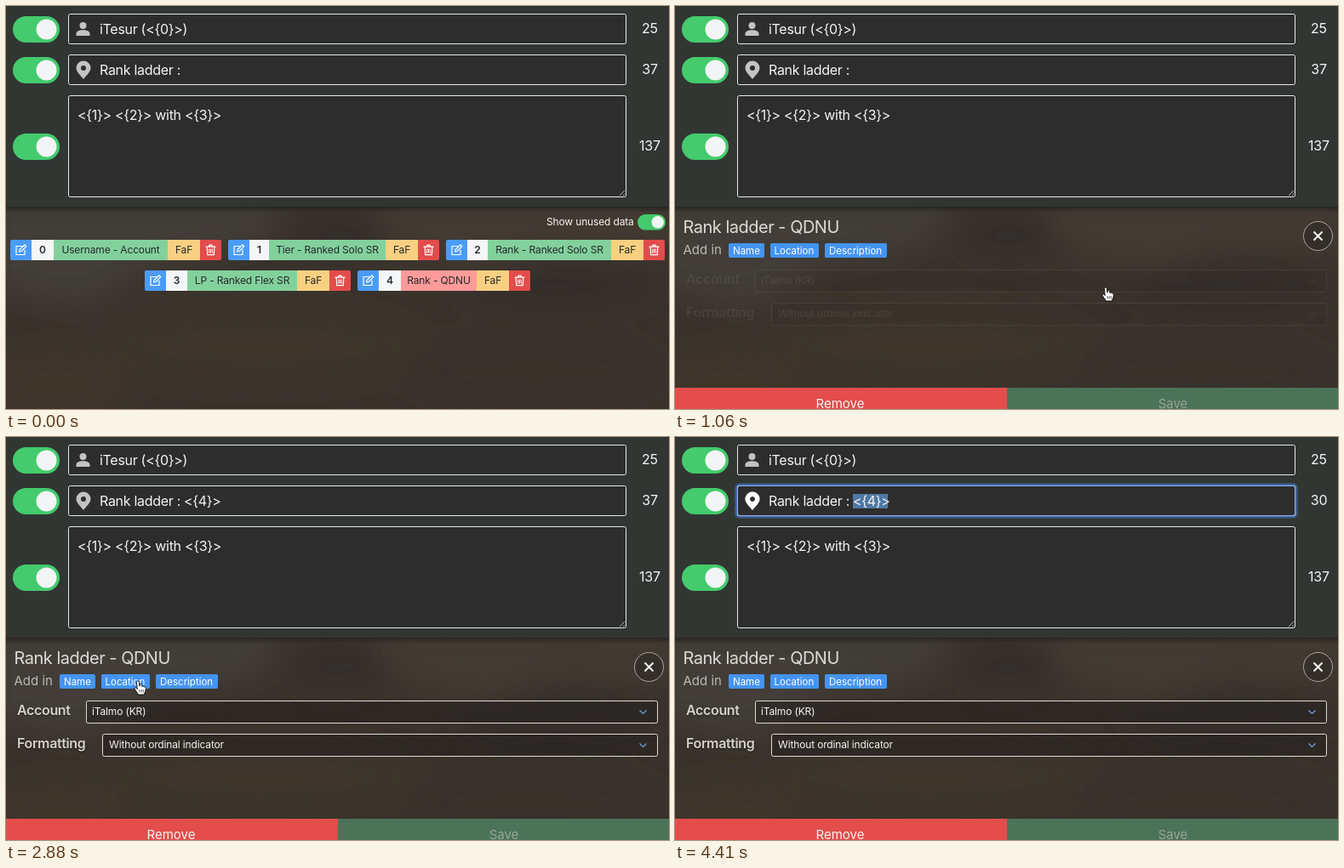
Animation, 779 px wide and 474 px high, one loop 5.82 s. Source, as an HTML page:

```html
<!DOCTYPE html>
<html lang="en">
<head>
<meta charset="utf-8">
<title>Ranked data editor</title>
<style>
html, body { margin: 0; width: 100%; height: 100%; overflow: hidden; background: #313632; }
svg { display: block; }
text { font: 12px Inter, Roboto, sans-serif; letter-spacing: -.15px; fill: #f4f4f4; }
.input { font-size: 16px; letter-spacing: -.3px; }
.count { font-size: 16px; letter-spacing: -.2px; text-anchor: middle; }
.mid { text-anchor: middle; }
.dark { fill: #25282b; }
.num { font-weight: 600; }
.title { font-size: 20px; letter-spacing: -.5px; fill: #dddbd8; }
.sub { font-size: 15px; letter-spacing: 0; fill: #bcb9b5; }
.badge { font-size: 11.5px; letter-spacing: 0; fill: #fff; }
.label { font-size: 16px; font-weight: 600; letter-spacing: -.35px; fill: #d5d2ce; text-shadow: 0 1px 2px #0008; }
.button { font-size: 15px; letter-spacing: 0; text-anchor: middle; }
.box { fill: #2d2d2d; stroke: #e9e9e9; }
.select { fill: #24211e88; stroke: #dedbd7; }
.line { fill: none; stroke: #fff; stroke-width: 1.2; stroke-linecap: round; stroke-linejoin: round; }

/* 99 ticks per loop: one tick is 1.0101% */
.anim { animation: 5820ms step-end -6ms infinite; }
#border { animation-name: border; }
#glow { animation-name: glow; }
#caret { animation-name: caret; }
#caret2 { animation-name: caret2; }
#tags { animation-name: tags; }
#panel { animation-name: panel; }
#form { animation-name: form; }
#token { animation-name: token; }
#before { animation-name: before; }
#after { animation-name: after; }
#select { animation-name: select; transform-box: fill-box; transform-origin: left; }
#cursor { animation-name: move; }
#arrow { animation-name: arrow; }
#hand { animation-name: hand; }
#beam { animation-name: beam; }

@keyframes border { 0%, 15.15% { opacity: 0 } 1.01%, 58.58% { opacity: 1 } }
@keyframes glow { 0%, 15.15% { opacity: 0 } 1.01%, 59.59% { opacity: 1 } }
@keyframes caret { 0%, 10.1% { opacity: 0 } 1.01% { opacity: 1 } }
@keyframes caret2 { 0%, 61.61% { opacity: 0 } 58.58% { opacity: 1 } }
@keyframes tags { 0% { opacity: 1 } 18.18% { opacity: 0 } }
@keyframes panel { 0% { opacity: 0 } 18.18% { opacity: 1 } }
@keyframes form {
  0% { opacity: .08 }
  18.18% { opacity: .08; animation-timing-function: steps(9) }
  27.27% { opacity: 1 }
}
@keyframes token { 0% { opacity: 0 } 45.45% { opacity: 1 } }
@keyframes before { 0% { opacity: 1 } 58.58% { opacity: 0 } }
@keyframes after { 0% { opacity: 0 } 58.58% { opacity: 1 } }
@keyframes select {
  0% { transform: scaleX(0) }
  60.6% { transform: scaleX(0); animation-timing-function: steps(4) }
  64.64% { transform: scaleX(1) }
}
@keyframes move {
  0% { transform: translate(497px, 424px) }
  4.04% { transform: translate(497px, 424px); animation-timing-function: steps(4) }
  8.08% { transform: translate(499px, 352px); animation-timing-function: steps(6) }
  14.14% { transform: translate(506px, 331px) }
  19.19% { transform: translate(506px, 331px); animation-timing-function: steps(8) }
  27.27% { transform: translate(400px, 342px); animation-timing-function: steps(4) }
  31.31% { transform: translate(205px, 314px); animation-timing-function: steps(2) }
  33.33% { transform: translate(164px, 296px); animation-timing-function: steps(4) }
  37.37% { transform: translate(155px, 291px) }
  38.38% { transform: translate(154px, 290px) }
  49.49% { transform: translate(155px, 287px); animation-timing-function: steps(3) }
  52.52% { transform: translate(172px, 240px); animation-timing-function: steps(3) }
  55.55% { transform: translate(203px, 130px); animation-timing-function: steps(3) }
  58.58% { transform: translate(210px, 76px) }
  60.6% { transform: translate(210px, 76px); animation-timing-function: steps(4) }
  64.64% { transform: translate(251px, 76px) }
  69.69% { transform: translate(252px, 96px); animation-timing-function: steps(3) }
  72.72% { transform: translate(259px, 260px); animation-timing-function: steps(3) }
  75.75% { transform: translate(270px, 480px) }
}
@keyframes arrow {
  0%, 11.11%, 32.32%, 53.53%, 75.75% { opacity: 0 }
  4.04%, 21.21%, 50.5%, 72.72% { opacity: 1 }
}
@keyframes hand { 0%, 21.21%, 50.5% { opacity: 0 } 11.11%, 32.32% { opacity: 1 } }
@keyframes beam { 0%, 72.72% { opacity: 0 } 53.53% { opacity: 1 } }
</style>
</head>
<body>
<svg width="779" height="474" viewBox="0 0 779 474">
  <defs>
    <filter id="soft" x="-50%" y="-50%" width="200%" height="200%"><feGaussianBlur stdDeviation="16"/></filter>
    <filter id="halo" x="-5%" y="-40%" width="110%" height="180%"><feGaussianBlur stdDeviation="1.2"/></filter>
    <clipPath id="lower"><rect y="236" width="779" height="238"/></clipPath>
    <linearGradient id="edge" x2="0" y2="1"><stop stop-color="#1f1f1c" stop-opacity=".7"/><stop offset="1" stop-color="#1f1f1c" stop-opacity="0"/></linearGradient>
    <g id="toggle">
      <rect width="55" height="31" rx="15.5" fill="#43cb6d"/>
      <circle cx="39.5" cy="15.5" r="12" fill="#f3f4f5"/>
    </g>
    <path id="pin" fill-rule="evenodd" d="M91 86C88 82 82.5 77.500 82.500 73A8.500 8.500 0 0 1 99.500 73C99.500 77.500 94 82 91 86ZM91 70A3 3 0 1 0 91 76A3 3 0 1 0 91 70Z"/>
    <g id="edit" class="line">
      <path d="M1-4.500H-5.500V5.500H4.500V0"/>
      <path d="M-2 2L-1.500-.500L4.500-6.200L6.300-4.400L.500 1.500Z"/>
    </g>
    <g id="trash" class="line">
      <path d="M-5.500-3.800H5.500M-2.300-4L-1.500-5.800H1.500L2.300-4M-4.300-3.500L-3.800 5.600H3.800L4.300-3.500"/>
      <path stroke-width="1" d="M-1.800-1V3.200M0-1V3.200M1.800-1V3.200"/>
    </g>
    <path id="chevron" d="M-4-2L0 2L4-2" fill="none" stroke="#6fa3dc" stroke-width="1.2"/>
  </defs>

  <rect width="779" height="237" fill="#313632"/>
  <g clip-path="url(#lower)">
    <rect y="236" width="779" height="238" fill="#3a332c"/>
    <g filter="url(#soft)">
      <path d="M-20 230H330L290 280L180 300L90 350L-20 330Z" fill="#433d38"/>
      <path d="M420 230H790V290L650 280L560 310L470 290Z" fill="#423a32"/>
      <ellipse cx="390" cy="270" rx="55" ry="30" fill="#342f2a"/>
      <ellipse cx="650" cy="330" rx="120" ry="28" fill="#352f29"/>
      <ellipse cx="300" cy="400" rx="190" ry="45" fill="#3c352c"/>
      <ellipse cx="60" cy="445" rx="85" ry="40" fill="#40342b"/>
      <ellipse cx="620" cy="430" rx="150" ry="40" fill="#38322c"/>
    </g>
    <rect y="236" width="779" height="7" fill="url(#edge)"/>
  </g>

  <use href="#toggle" x="8" y="12"/>
  <use href="#toggle" x="8" y="60"/>
  <use href="#toggle" x="8" y="150"/>

  <rect class="box" x="73.500" y="9.500" width="655" height="35" rx="2"/>
  <g fill="#c3c3c3">
    <circle cx="90.500" cy="23" r="4"/>
    <path d="M82.500 35V32.500C82.500 29.500 87 28.300 90.500 28.300S98.500 29.500 98.500 32.500V35Z"/>
  </g>
  <text class="input" x="110" y="33">iTesur (&lt;{0}&gt;)</text>
  <text class="count" x="756.500" y="32">25</text>

  <rect id="glow" class="anim" x="72.500" y="56.500" width="657" height="37" rx="3" fill="none" stroke="#4f82d8" stroke-width="2.500" filter="url(#halo)"/>
  <rect class="box" x="73.500" y="57.500" width="655" height="35" rx="2"/>
  <use href="#pin" fill="#c3c3c3"/>
  <g id="border" class="anim">
    <rect x="73.500" y="57.500" width="655" height="35" rx="2" fill="none" stroke="#8fb4f5"/>
    <use href="#pin" fill="#fff"/>
  </g>
  <rect id="select" class="anim" x="209" y="67" width="41" height="17" fill="#507aa6"/>
  <text class="input" x="110" y="81">Rank ladder :</text>
  <text id="token" class="input anim" x="209" y="81">&lt;{4}&gt;</text>
  <rect id="caret" class="anim" x="205" y="67" width="1" height="17" fill="#fff"/>
  <rect id="caret2" class="anim" x="209" y="67" width="1" height="17" fill="#fff"/>
  <text id="before" class="count anim" x="756.500" y="80">37</text>
  <text id="after" class="count anim" x="756.500" y="80">30</text>

  <rect class="box" x="73.500" y="105.500" width="655" height="119" rx="2"/>
  <path d="M721 223L727 217M725 223L727 221" stroke="#aaa" fill="none"/>
  <text class="input" x="84" y="134">&lt;{1}&gt; &lt;{2}&gt; with &lt;{3}&gt;</text>
  <text class="count" x="756.500" y="170">137</text>

  <g id="tags" class="anim">
    <text x="635" y="258">Show unused data</text>
    <use href="#toggle" transform="translate(742 245) scale(.6)"/>
  </g>

  <g id="panel" class="anim">
    <text class="title" x="9.500" y="267">Rank ladder - QDNU</text>
    <text class="sub" x="9.500" y="292">Add in</text>
    <g fill="#4494f3">
      <rect x="63" y="279" width="42" height="17" rx="2"/>
      <rect x="112" y="279" width="57" height="17" rx="2"/>
      <rect x="176" y="279" width="73" height="17" rx="2"/>
    </g>
    <text class="badge" x="68" y="292">Name</text>
    <text class="badge" x="116.500" y="292">Location</text>
    <text class="badge" x="181" y="292">Description</text>
    <circle cx="755.500" cy="270.500" r="17" fill="#2b282588" stroke="#aaa7a3"/>
    <path d="M750.500 265.500L760.500 275.500M760.500 265.500L750.500 275.500" stroke="#fff" stroke-width="2"/>
    <g id="form" class="anim">
      <text class="label" x="13" y="327">Account</text>
      <rect class="select" x="94.500" y="310.500" width="671" height="26" rx="2"/>
      <text x="101" y="327">iTalmo (KR)</text>
      <use href="#chevron" x="748.500" y="323.500"/>
      <text class="label" x="13" y="366">Formatting</text>
      <rect class="select" x="113.500" y="349.500" width="652" height="26" rx="2"/>
      <text x="121" y="366">Without ordinal indicator</text>
      <use href="#chevron" x="748.500" y="362.500"/>
    </g>
    <rect y="449" width="390" height="25" fill="#e34d4b"/>
    <rect x="390" y="449" width="389" height="25" fill="#4b7358"/>
    <text class="button" x="194" y="473">Remove</text>
    <text class="button" x="585" y="473" style="fill:#96a69b">Save</text>
  </g>

  <g id="cursor" class="anim">
    <path id="arrow" class="anim" d="M0 0V15.500L3.600 12.200L6 18L8.700 16.900L6.300 11.300H11.200Z" fill="#111" stroke="#fff"/>
    <g id="hand" class="anim">
      <path d="M-1.500 1.500C-1.500-.500 1.300-.500 1.500 1.500L2 6C3-.2 5 5.200 4.800 6.500C5.500 5.500 7.200 5.800 7.300 7C8.200 6.500 9.300 7 9.300 8.500C9.300 12 8 13 7.500 16H.500C-.500 13.500-3 11.500-4 9C-4.300 7.500-2.700 7.300-1.500 8.800L-.800 9.500Z" fill="#fff" stroke="#111"/>
      <path d="M2 10V13.500M4.200 10V13.500M6.300 10V13.500" stroke="#333" stroke-width=".8"/>
    </g>
    <g id="beam" class="anim" fill="none">
      <path d="M-3-8.500C-1-8.500 0-8 0-6.500V6.500C0 8-1 8.500-3 8.500M3-8.500C1-8.500 0-8 0-6.500M0 6.500C0 8 1 8.500 3 8.500M-2 3H2" stroke="#c8c8c8" stroke-width="2"/>
      <path d="M-3-8.500C-1-8.500 0-8 0-6.500V6.500C0 8-1 8.500-3 8.500M3-8.500C1-8.500 0-8 0-6.500M0 6.500C0 8 1 8.500 3 8.500M-2 3H2" stroke="#111"/>
    </g>
  </g>
</svg>
<script>
const GREEN = '#82d19d', PINK = '#ff9b9a';
// left, top, number width, label width, label, colour
const tags = [
  [5, 275, 26, 134, 'Username - Account', GREEN],
  [261, 275, 23, 137, 'Tier - Ranked Solo SR', GREEN],
  [517, 275, 24, 145, 'Rank - Ranked Solo SR', GREEN],
  [163, 311, 25, 129, 'LP - Ranked Flex SR', GREEN],
  [413, 311, 26, 89, 'Rank - QDNU', PINK]
];

function tag([x, y, numW, labelW, label, colour], i) {
  const parts = [
    [25, '#4a9cfa', '', '#edit'],
    [numW, '#f5f6f7', i, '', 'num'],
    [labelW, colour, label],
    [38, '#f9d081', 'FaF'],
    [25, '#e24c4b', '', '#trash']
  ];
  const total = parts.reduce((sum, p) => sum + p[0], 0);
  let left = x, out = '';
  for (const [w, fill, words, icon, kind = ''] of parts) {
    const mid = left + w / 2;
    out += `<rect x="${left}" y="${y}" width="${w}" height="24" fill="${fill}"/>`;
    out += icon
      ? `<use href="${icon}" x="${mid}" y="${y + 12}"/>`
      : `<text class="mid dark ${kind}" x="${mid}" y="${y + 16}">${words}</text>`;
    left += w;
  }
  return `<clipPath id="tag${i}"><rect x="${x}" y="${y}" width="${total}" height="24" rx="2"/></clipPath>
    <g clip-path="url(#tag${i})">${out}</g>`;
}

document.getElementById('tags').insertAdjacentHTML('beforeend', tags.map(tag).join(''));
</script>
</body>
</html>
```
